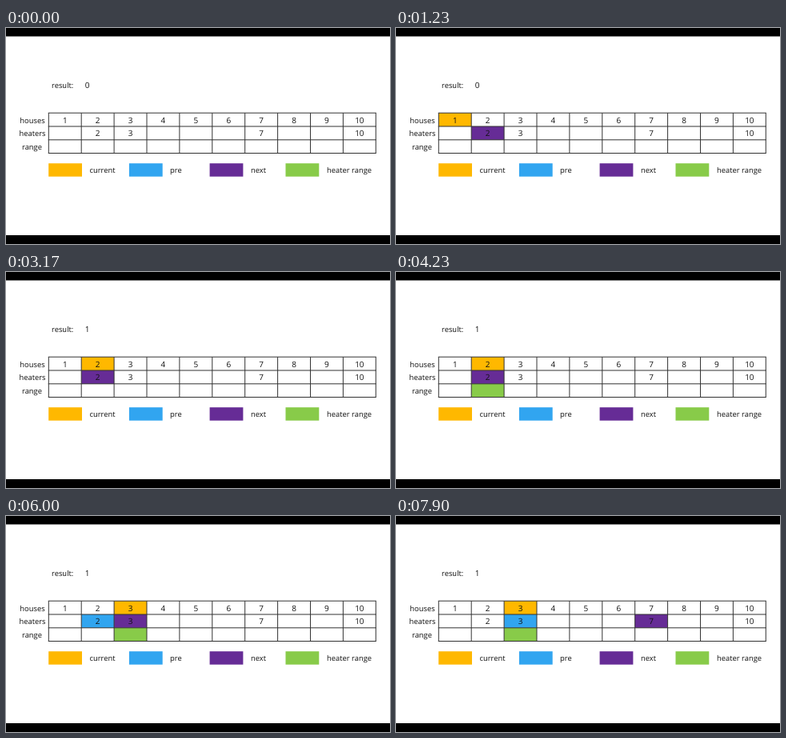
An HTML page with a canvas that plays this animation: 480 px wide and 270 px high, repeating every 8 s.

```html
<!DOCTYPE html>
<html lang="en">
<head>
<meta charset="utf-8">
<style>
  html, body { margin: 0; width: 100%; height: 100%; overflow: hidden; background: #fff; }
  canvas { display: block; width: 480px; height: 270px; }
</style>
</head>
<body>
<canvas id="stage" width="480" height="270"></canvas>
<script>
const ctx = document.getElementById('stage').getContext('2d');
const COLORS = { current: '#ffb800', pre: '#31a5f0', next: '#662c96', range: '#88cb49' };
const LEFT = 53.3, COLUMN = 40.9;
const ROWS = [106.2, 123, 139.8, 156.5];
const HEATERS = [2, 3, 7, 10];
const LOOP = 8000;

// Each step holds from its start time until the next one begins.
const STEPS = [
  { at: 0, result: 0 },
  { at: 250, result: 0, current: 1, next: 2 },
  { at: 1250, result: 1, current: 1, next: 2, range: [1, 3] },
  { at: 2500, result: 1, current: 2, next: 2 },
  { at: 3650, result: 1, current: 2, next: 2, range: [2, 2] },
  { at: 4700, result: 1, current: 3, pre: 2, next: 3 },
  { at: 5600, result: 1, current: 3, pre: 2, next: 3, range: [3, 3] },
  { at: 7000, result: 1, current: 3, pre: 3, next: 7, range: [3, 3] }
];

function box(x, y, w, h, color) {
  ctx.fillStyle = color;
  ctx.fillRect(x, y, w, h);
}

function text(value, x, y, align = 'left', size = 9.4) {
  ctx.font = `${size}px "Open Sans", "Noto Sans", sans-serif`;
  ctx.textRendering = 'geometricPrecision';
  ctx.textAlign = align;
  ctx.fillStyle = '#111';
  ctx.fillText(value, x, y);
}

function line(x1, y1, x2, y2) {
  ctx.beginPath();
  ctx.moveTo(x1, y1);
  ctx.lineTo(x2, y2);
  ctx.stroke();
}

const columnX = column => LEFT + (column - 1) * COLUMN;

function fillCell(row, column, color) {
  if (column) box(columnX(column), ROWS[row], COLUMN, ROWS[row + 1] - ROWS[row], color);
}

function number(value, column, y) {
  text(value, columnX(column) + COLUMN / 2, y, 'center', 10);
}

function drawTable(step) {
  fillCell(0, step.current, COLORS.current);
  fillCell(1, step.pre, COLORS.pre);
  fillCell(1, step.next, COLORS.next);
  if (step.range) {
    for (let c = step.range[0]; c <= step.range[1]; c++) fillCell(2, c, COLORS.range);
  }

  ctx.strokeStyle = '#333';
  ctx.lineWidth = 1;
  ROWS.forEach(y => line(LEFT - 0.5, y, columnX(11) + 0.5, y));
  for (let c = 1; c <= 11; c++) line(columnX(c), ROWS[0], columnX(c), ROWS[3]);

  text('houses', 17.3, 118.5);
  text('heaters', 16.5, 135.3);
  text('range', 20, 152.3);
  for (let c = 1; c <= 10; c++) number(c, c, 118.5);
  HEATERS.forEach(c => number(c, c, 135.3));
}

function drawLegend() {
  const items = [
    [53.2, 104.5, 'current', COLORS.current],
    [153.9, 205, 'pre', COLORS.pre],
    [254.6, 306, 'next', COLORS.next],
    [349.5, 401, 'heater range', COLORS.range]
  ];
  for (const [x, labelX, label, color] of items) {
    box(x, 169.2, 41.8, 16.5, color);
    text(label, labelX, 181.4);
  }
}

function draw(now) {
  const time = now % LOOP;
  const step = STEPS.findLast(s => s.at <= time);
  box(0, 0, 480, 270, '#fff');
  box(0, 0, 480, 10.5, '#000');
  box(0, 259, 480, 11, '#000');
  text('result:', 57, 75);
  text(step.result, 101.5, 75, 'center', 10);
  drawTable(step);
  drawLegend();
}

function tick() {
  draw(performance.now());
  requestAnimationFrame(tick);
}
tick();
</script>
</body>
</html>
```
